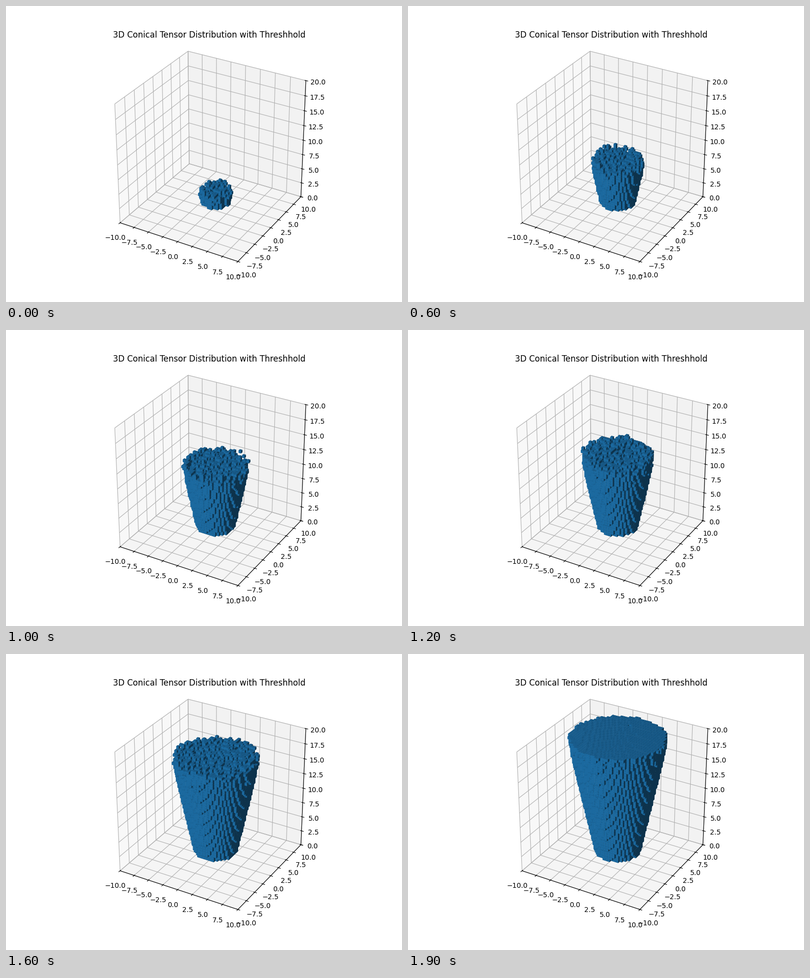
Write a matplotlib script that moves like this. It is 800 px wide and 600 px high and loops after 2000 ms.

```python
import numpy as np
import matplotlib.pyplot as plt
from matplotlib.animation import FuncAnimation
from mpl_toolkits.mplot3d.art3d import Poly3DCollection

FRAMES = 20
CELL = 20 / 49
SIDE, LAYERS = 39, 47          # cells across and in height
CENTRE = CELL                  # cone axis in x and y
ORIGIN = np.array([CENTRE - CELL * SIDE / 2, CENTRE - CELL * SIDE / 2,
                   20 + CELL - CELL * LAYERS])
BLUE = np.array([0x1F, 0x77, 0xB4]) / 255
LIGHT = np.array([-2, -2, 1]) / 3
SQUARE = np.array([(0, 0), (1, 0), (1, 1), (0, 1)])

rng = np.random.default_rng(7)
shape = (SIDE, SIDE, LAYERS)
top_noise = rng.random(shape)
side_noise = rng.random(shape)

ix, iy, iz = np.indices(shape)
radius = CELL * np.hypot(ix - SIDE // 2, iy - SIDE // 2)
height = ORIGIN[2] + CELL * (iz + 0.5)


def fill(frame):
    """Cells inside the growing cone and below its rough upper front."""
    front = 4.15 + 0.85 * frame + 0.6 * max(0, frame - 17)
    depth = np.maximum(front - height, 0)
    limit = 2.05 + 0.06 * frame + 0.2 * (height - 1.2)
    limit = limit + 0.1 - 0.7 * side_noise * np.exp(-depth / 1.8)
    return (radius <= limit) & (height + 1.3 * top_noise <= front)


def shell(cells):
    """Quads and shaded colours of all exposed cell faces."""
    padded = np.pad(cells, 1)
    quads, colors = [], []
    for axis in range(3):
        for sign in (-1, 1):
            beside = np.roll(padded, -sign, axis)[1:-1, 1:-1, 1:-1]
            index = np.argwhere(cells & ~beside)
            corners = np.insert(SQUARE, axis, int(sign > 0), axis=1)
            quads.append(ORIGIN + CELL * (index[:, None] + corners))
            shade = 0.65 + 0.35 * sign * LIGHT[axis]
            colors.append(np.tile([*(BLUE * shade), 1], (len(index), 1)))
    return np.concatenate(quads), np.concatenate(colors)


fig = plt.figure(figsize=(8, 6), dpi=100)
ax = fig.add_subplot(projection="3d")
ax.set_box_aspect((1, 1, 1))
ax.set(xlim=(-10, 10), ylim=(-10, 10), zlim=(0, 20))
ax.set_title("3D Conical Tensor Distribution with Threshhold")

first_quads, first_colors = shell(fill(0))
solid = Poly3DCollection(first_quads, facecolors=first_colors)
ax.add_collection3d(solid)
ax.set(xlim=(-10, 10), ylim=(-10, 10), zlim=(0, 20))


def update(frame):
    quads, colors = shell(fill(frame))
    solid.set_verts(quads)
    solid.set_facecolor(colors)
    return (solid,)


anim = FuncAnimation(fig, update, frames=FRAMES, interval=100, repeat=True)
plt.show()
```
